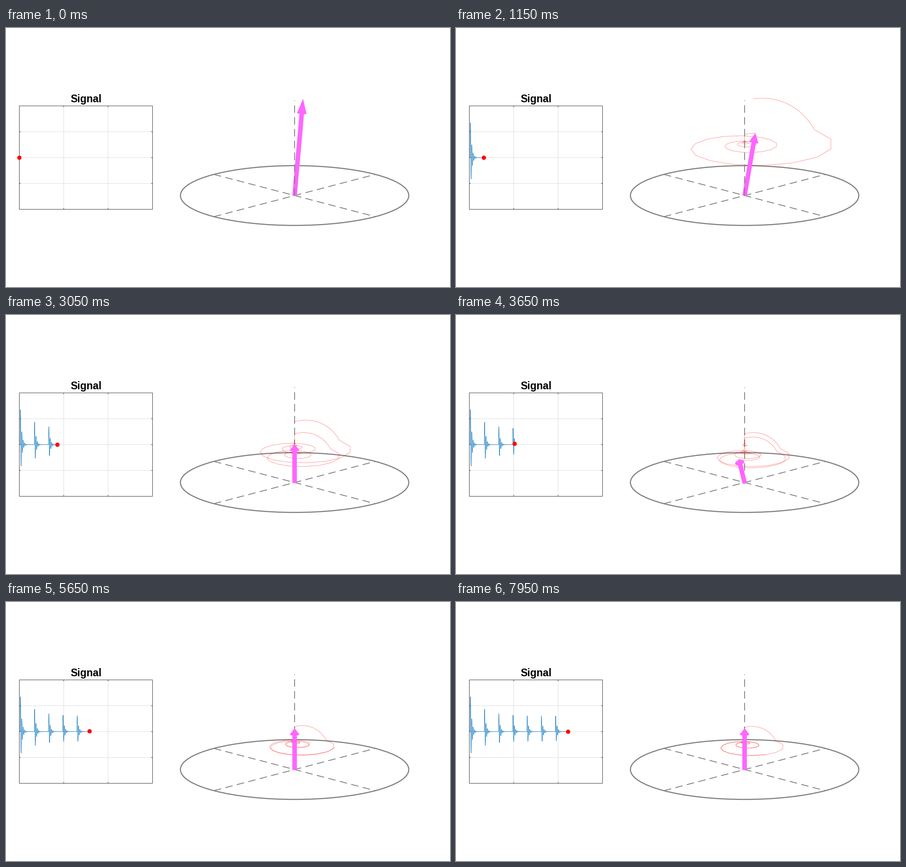
Animation, 980 px wide and 572 px high, one loop 8 s. Source, as a matplotlib script:

```python
import numpy as np
import matplotlib.pyplot as plt
from matplotlib.animation import FuncAnimation
from matplotlib.patches import Ellipse, Polygon, Rectangle

W, H, DPI = 980, 572, 100
PT = 72 / DPI                    # points per pixel
FRAMES, INTERVAL, STEPS = 160, 50, 7
TR, PULSE, TRAIL = 160, 10, 300  # simulation steps
T1, T2 = 450, 15
FLIP, PRECESS = np.radians(6), np.radians(24)

LEFT, RIGHT, TOP, BOTTOM = 29.4, 323.4, 172.0, 400.4
MID, HALF = (TOP + BOTTOM) / 2, (BOTTOM - TOP) / 2
CX, CY, RX, RY, RZ = 637, 370, 252, 66, 210
STEM, HEAD = 5, 10.4             # arrow radii
GRID, GRAY, DARK, PINK = "#dedede", "#7f7f7f", "#262626", "#ff66ff"


def simulate(count):
    """Magnetisation (a, b, z): a along the flip direction, b across it."""
    a, b, z = 0.0, 0.0, 1.0
    out = []
    for k in range(count):
        if k % TR < PULSE:
            c, s = np.cos(FLIP), np.sin(FLIP)
            a, z = a * c + z * s, z * c - a * s
        else:
            c, s = np.cos(PRECESS), np.sin(PRECESS)
            decay = np.exp(-1 / T2)
            a, b = (a * c - b * s) * decay, (b * c + a * s) * decay
            z = 1 - (1 - z) * np.exp(-1 / T1)
        out.append((a, b, z))
    return np.array(out)


mag = simulate((FRAMES - 1) * STEPS + 1)
a, b, z = mag.T
h = np.sqrt(0.5)
right, back = h * (a + b), h * (a - b)
path = np.column_stack([CX + RX * right, CY - RZ * z - RY * back])

# cosine between the arrow and the line of sight
sin_el = RY / RX
facing = np.abs(z * sin_el - back * np.sqrt(1 - sin_el ** 2))
facing /= np.linalg.norm(mag, axis=1)

sig_x = LEFT + (RIGHT - LEFT) / 1500 * np.arange(len(mag))
sig_y = MID - HALF * b

fig = plt.figure(figsize=(W / DPI, H / DPI), dpi=DPI, facecolor="white")
ax = fig.add_axes([0, 0, 1, 1])
ax.set_xlim(0, W)
ax.set_ylim(H, 0)
ax.axis("off")


def line(xs, ys, color, width, **kw):
    kw.setdefault("solid_capstyle", "butt")
    return ax.plot(xs, ys, color=color, lw=width * PT, snap=False, **kw)[0]


def dashed(xs, ys):
    width = 1.8
    return line(xs, ys, GRAY, width, dash_capstyle="butt", zorder=1,
                linestyle=(0, (16.6 / width, 9.5 / width)))


# signal panel
for i in (1, 2):
    x = LEFT + (RIGHT - LEFT) * i / 3
    line([x, x], [TOP, BOTTOM], GRID, 1, zorder=1)
    for y0, y1 in ((TOP, TOP + 3), (BOTTOM, BOTTOM - 3)):
        line([x, x], [y0, y1], DARK, 0.9, zorder=2)
for i in (1, 2, 3):
    y = TOP + (BOTTOM - TOP) * i / 4
    line([LEFT, RIGHT], [y, y], GRID, 1, zorder=1)
    for x0, x1 in ((LEFT, LEFT + 3), (RIGHT, RIGHT - 3)):
        line([x0, x1], [y, y], DARK, 0.9, zorder=2)
ax.add_patch(Rectangle((LEFT, TOP), RIGHT - LEFT, BOTTOM - TOP, fill=False,
                       ec=DARK, lw=0.9 * PT, snap=False, zorder=2))
ax.text((LEFT + RIGHT) / 2, 164, "Signal", family="Liberation Sans",
        weight="bold", size=23 * PT, ha="center", va="baseline")
signal = line([], [], "#0072bd", 0.8, zorder=3, solid_joinstyle="round")
dot = ax.plot([], [], "o", color="red", ms=9.4 * PT, mew=0, snap=False,
              zorder=6)[0]

# transverse plane and axes
ax.add_patch(Ellipse((CX, CY), 2 * RX, 2 * RY, fill=False, ec=GRAY,
                     lw=2.4 * PT, zorder=1))
dx, dy = RX * h, RY * h
dashed([CX - dx, CX + dx], [CY - dy, CY + dy])
dashed([CX - dx, CX + dx], [CY + dy, CY - dy])
axis_z = dashed([CX, CX], [CY, CY - RZ])

trails = [line([], [], "red", 0.8, alpha=0.5, zorder=3) for _ in range(3)]
arrow = ax.add_patch(Polygon(np.zeros((7, 2)), fc=PINK, ec="none", zorder=4))
foot, rim = [ax.add_patch(Ellipse((CX, CY), 2 * r, r, fc=PINK, ec="none",
                                  zorder=4)) for r in (STEM, HEAD)]


def place_arrow(tip, ratio):
    base = np.array([CX, CY])
    v = tip - base
    n = np.array([-v[1], v[0]]) / np.hypot(*v)
    neck = base + 0.85 * v
    arrow.set_xy([base + STEM * n, neck + STEM * n, neck + HEAD * n, tip,
                  neck - HEAD * n, neck - STEM * n, base - STEM * n])
    for disc, centre in ((foot, base), (rim, neck)):
        disc.set_center(centre)
        disc.set_height(disc.get_width() * ratio)
        disc.set_angle(np.degrees(np.arctan2(n[1], n[0])))


def update(frame):
    k = frame * STEPS
    signal.set_data(sig_x[:k + 1], sig_y[:k + 1])
    # the marker moves on a 0.8 px lattice
    dot.set_data([LEFT + 0.8 * np.floor((sig_x[k] - LEFT) / 0.8)],
                 [MID + 0.8 * np.floor((sig_y[k] - MID) / 0.8)])

    # one line per repetition, so that overlaps look denser
    start = max(0, k - TRAIL)
    for i, trail in enumerate(trails):
        cycle = start // TR + i
        lo = max(start, cycle * TR - 1)
        hi = max(lo, min(k + 1, (cycle + 1) * TR))
        trail.set_data(path[lo:hi, 0], path[lo:hi, 1])

    place_arrow(path[k], facing[k])
    axis_z.set_zorder(5 if back[k] > 1e-3 else 1)
    return [signal, dot, arrow, foot, rim, axis_z, *trails]


anim = FuncAnimation(fig, update, frames=FRAMES, interval=INTERVAL,
                     repeat=True, blit=False)
plt.show()
```
